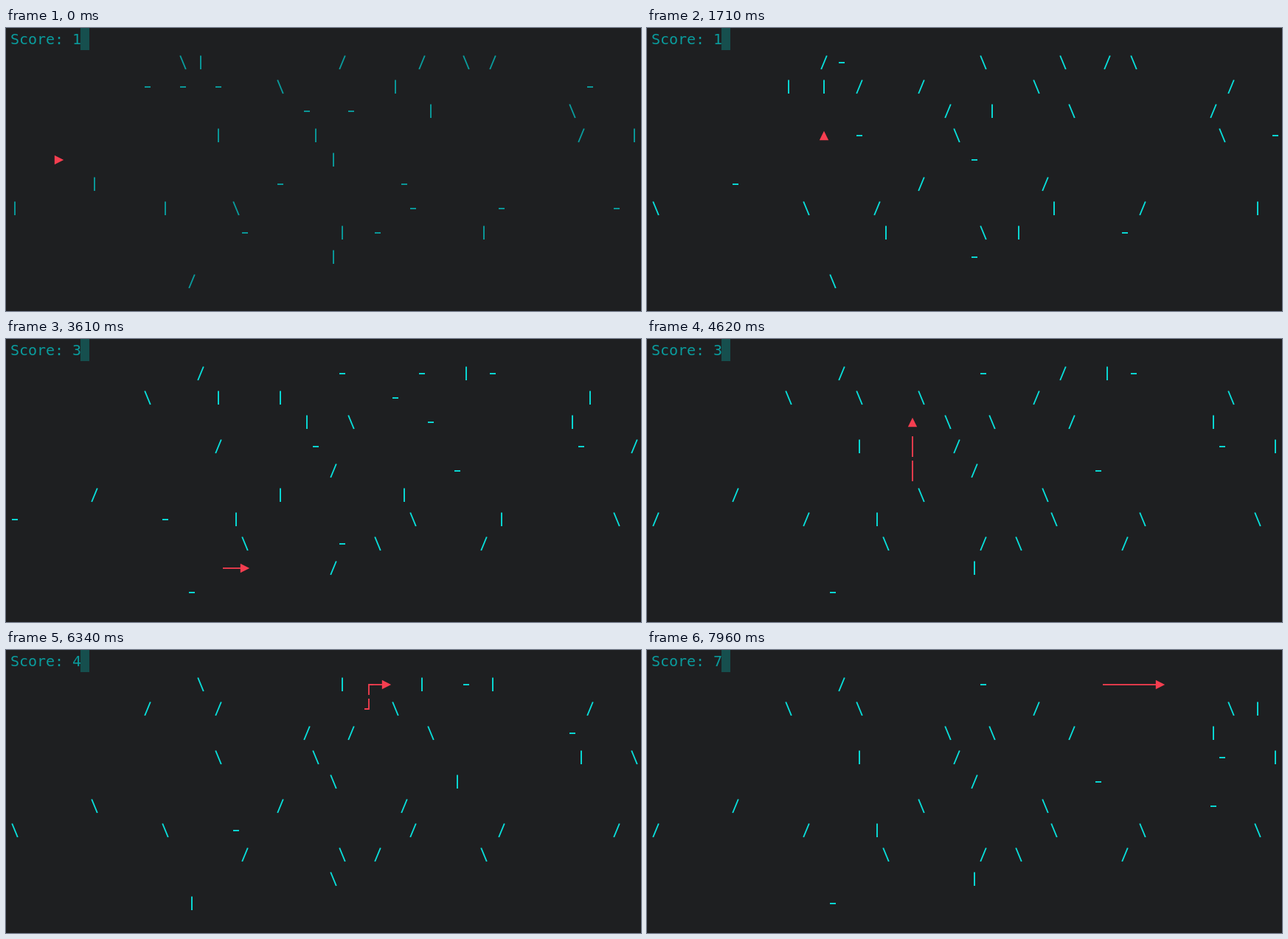
These frames come from a looping animation (861x384 px, 8 s). An HTML page with a canvas:

```html
<!DOCTYPE html>
<html lang="en">
<head>
<meta charset="utf-8">
<title>Terminal snake</title>
<style>
  html, body { margin: 0; width: 100%; height: 100%; overflow: hidden; background: #1e1f21; }
  canvas { display: block; }
</style>
</head>
<body>
<canvas id="stage" width="861" height="384"></canvas>
<script>
const ctx = document.getElementById('stage').getContext('2d');
const LOOP = 8000;
const BACK = '#1e1f21', TEAL = '#0a9c9d', CYAN = '#09dfdb', RED = '#f53e50', CURSOR = '#164f4e';

const cellX = col => 12 + 12 * col;
const cellY = row => 14 + 33 * row;

// Repaint times: runs of [start, count], 100 ms apart; one move per repaint.
const ticks = [
  [0, 6], [700, 6], [1320, 3], [1710, 11], [2910, 8], [3730, 3],
  [4120, 10], [5220, 3], [5540, 5], [6140, 11], [7340, 4], [7760, 3]
].flatMap(([start, n]) => Array.from({ length: n }, (_, i) => start + 100 * i));

// Head position and direction at every move.
const DIRS = { R: [1, 0], U: [0, -1], D: [0, 1] };
const path = [{ col: 5, row: 5, dir: 'R' }];
for (const leg of 'R14 U4 R1 D8 R9 U7 R11 U1 R17'.split(' ')) {
  const dir = leg[0], [dx, dy] = DIRS[dir];
  for (let n = +leg.slice(1); n > 0; n--) {
    const last = path[path.length - 1];
    path.push({ col: last.col + dx, row: last.row + dy, dir });
  }
}

// Spinner timers: time of the first turn and period.
const TIMERS = { A: [132, 276], B: [147, 276], C: [17, 276], D: [207, 277], E: [77, 276] };

// One string per row; each entry is column:phase+timer. Phases run | / - \
const ROWS = [
  '19:3A 21:0A 37:1A 46:1D 51:3A 54:1A',
  '15:2A 19:2A 23:2C 30:3D 43:0C 65:2C',
  '33:2C 38:2A 47:0C 63:3B',
  '23:0D 34:0C 64:1B 70:0D',
  '36:0A',
  '9:0A 30:2C 44:2C',
  '0:0C 17:0C 25:3A 45:2A 55:2C 68:2B',
  '26:2A 37:0C 41:2A 53:0E',
  '36:0D',
  '20:1A'
];
const items = ROWS.flatMap((line, i) => line.split(' ').map(entry => {
  const [col, spin] = entry.split(':');
  return { col: +col, row: i + 1, phase: +spin[0], timer: spin[1], born: 0 };
}));
items.push(
  { col: 50, row: 5, phase: 1, timer: 'E', born: 17 },
  { col: 68, row: 2, phase: 3, timer: 'E', born: 61 },
  { col: 63, row: 6, phase: 1, timer: 'E', born: 66 }
);
for (const item of items) {
  const step = path.findIndex(p => p.col === item.col && p.row === item.row);
  item.eaten = step < 0 ? Infinity : step;
}

function line(color, width, points) {
  ctx.strokeStyle = color;
  ctx.lineWidth = width;
  ctx.beginPath();
  points.forEach(([x, y]) => ctx.lineTo(x, y));
  ctx.stroke();
}

function drawItem(item, time) {
  const [first, period] = TIMERS[item.timer];
  const turns = Math.max(0, Math.floor((time - first) / period) + 1);
  const x = cellX(item.col), y = cellY(item.row);
  const top = y - 9.5, bottom = y + 9;
  const shapes = [
    [[x, top], [x, bottom]],
    [[x + 3.8, top], [x - 3.8, bottom]],
    [[x - 4, y], [x + 4, y]],
    [[x - 3.8, top], [x + 3.8, bottom]]
  ];
  line(turns ? CYAN : TEAL, 1.9, shapes[(item.phase + turns) % 4]);
}

function drawBody(cell, next) {
  const x = cellX(cell.col), y = cellY(cell.row);
  const [ix, iy] = DIRS[cell.dir], [ox, oy] = DIRS[next.dir];
  line(RED, 1.8, [
    [x - 6 * ix, y - 14 * iy], [x, y], [x + 6 * ox, y + 14 * oy]
  ]);
}

function drawHead({ col, row, dir }) {
  const [dx, dy] = DIRS[dir], x = cellX(col), y = cellY(row), r = 6.2;
  ctx.fillStyle = RED;
  ctx.beginPath();
  ctx.moveTo(x + dx * r, y + dy * r);
  ctx.lineTo(x - dx * r + dy * r, y - dy * r + dx * r);
  ctx.lineTo(x - dx * r - dy * r, y - dy * r - dx * r);
  ctx.fill();
}

function drawScore(score) {
  ctx.fillStyle = CURSOR;
  ctx.fillRect(101, 0, 12, 30);
  ctx.fillStyle = TEAL;
  ctx.font = '20px "DejaVu Sans Mono", monospace';
  ctx.textAlign = 'center';
  [...`Score: ${score}`].forEach((ch, i) => ctx.fillText(ch, cellX(i), 21.5));
}

function draw(now) {
  const t = now % LOOP;
  let step = ticks.length - 1;
  while (ticks[step] > t) step--;

  ctx.fillStyle = BACK;
  ctx.fillRect(0, 0, 861, 384);
  const score = 1 + items.filter(item => item.eaten <= step).length;
  drawScore(score);
  for (const item of items) {
    if (item.born <= step && step < item.eaten) drawItem(item, ticks[step]);
  }
  for (let i = Math.max(0, step - score + 1); i < step; i++) drawBody(path[i], path[i + 1]);
  drawHead(path[step]);
}

const begin = performance.now();
function loop() {
  draw(performance.now() - begin);
  requestAnimationFrame(loop);
}
loop();
</script>
</body>
</html>
```
